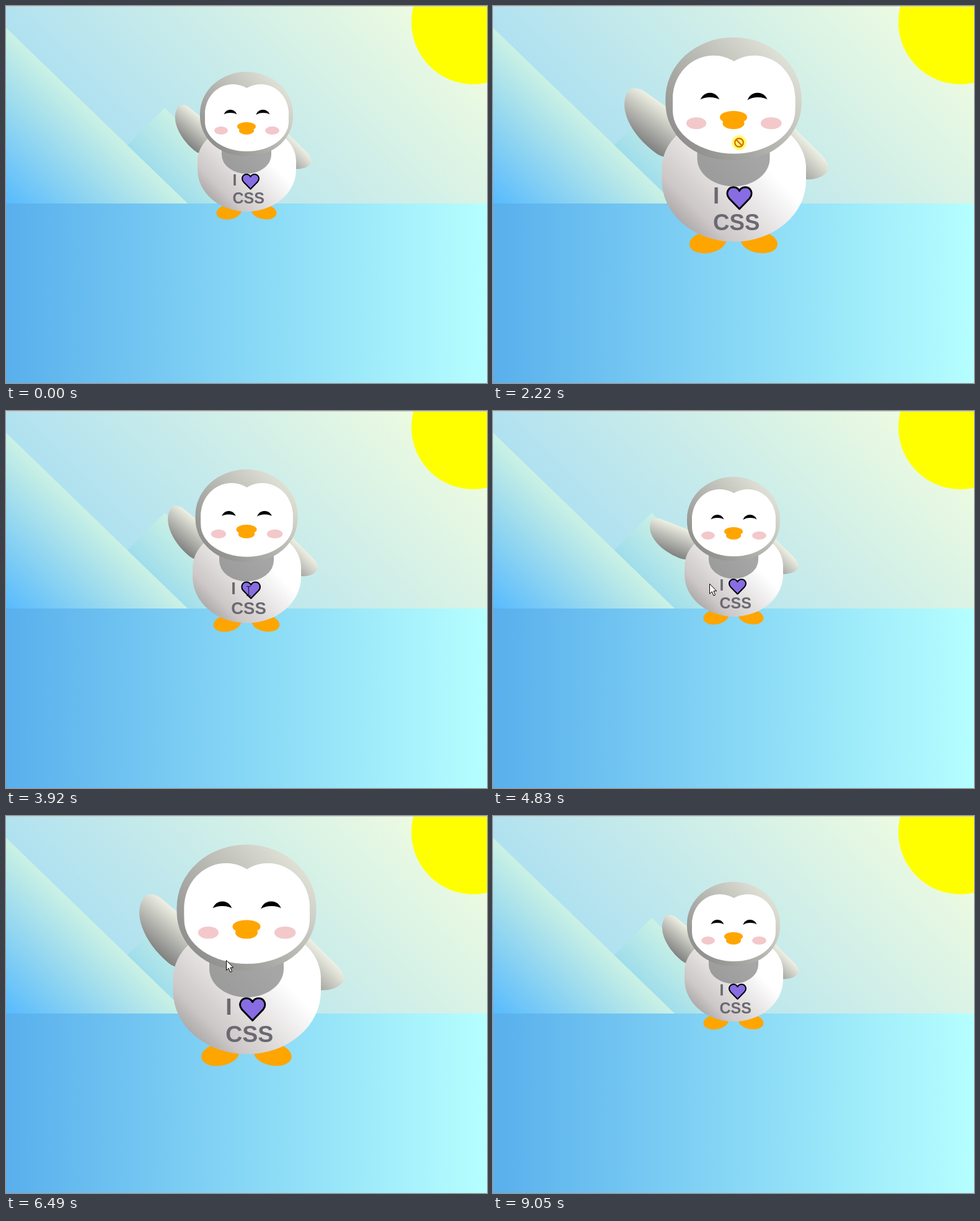
An HTML page that plays this animation: 776 px wide and 607 px high, repeating every 9090 ms.

```html
<!DOCTYPE html>
<html lang="en">
<head>
<meta charset="utf-8">
<title>Waving penguin</title>
<style>
:root { --face: white; --beak: orange; --skin: gray; }
html, body { margin: 0; width: 100%; height: 100%; overflow: hidden; background: #cbcbcb; }
body { position: relative; }
body *:not(svg *) { position: absolute; }

.sky { left: -4px; top: 1px; width: 784px; height: 682px;
  background: linear-gradient(45deg, rgb(118, 201, 255), rgb(247, 255, 222)); }
.scene { left: 0; top: 1px; width: 776px; height: 606px; overflow: hidden; }
.sun { left: 654px; top: -75px; width: 200px; height: 200px; border-radius: 50%; background: yellow; }
.mountain { width: 300px; height: 300px; }
.mountain.back { left: 106px; top: 225px; transform: rotate(45deg);
  background: linear-gradient(rgb(203, 241, 228), rgb(47, 170, 255)); }
.mountain.front { left: -4px; top: 175px; transform: skewY(44deg);
  background: linear-gradient(rgb(203, 241, 228), rgb(80, 183, 255)); }
.ground { left: -4px; top: 317px; width: 784px; height: 307px;
  background: linear-gradient(90deg, rgb(88, 175, 236), rgb(182, 255, 255)); }

.penguin { left: 238px; top: 76px; width: 300px; height: 300px; isolation: isolate; }
.head { width: 50%; height: 45%; top: 10%; left: 25%; z-index: 1;
  border-radius: 70% 70% 65% 65%;
  background: linear-gradient(45deg, var(--skin), rgb(239, 240, 228)); }
.face { width: 60%; height: 70%; top: 15%; border-radius: 70% 70% 60% 60%; background: var(--face); }
.face.left { left: 5%; }
.face.right { right: 5%; }
.chin { width: 90%; height: 70%; top: 25%; left: 5%;
  border-radius: 70% 70% 100% 100%; background: var(--face); }
.eye { width: 15%; height: 17%; top: 45%; border-radius: 50%; background: black; }
.eye.left { left: 25%; }
.eye.right { right: 25%; }
.lid { width: 150%; height: 100%; top: 25%; left: -23%; border-radius: 50%; background: var(--face); }
.blush { width: 15%; height: 10%; top: 65%; border-radius: 50%; background: #f3c8ca; }
.blush.left { left: 15%; }
.blush.right { right: 15%; }
.beak { height: 10%; border-radius: 50%; background: var(--beak); }
.beak.top { width: 20%; top: 60%; left: 40%; }
.beak.bottom { width: 16%; top: 65%; left: 42%; }

.shirt { top: 165px; left: 127.5px; z-index: 1; color: #6a6971;
  font: bold 25px "Liberation Sans", Helvetica, sans-serif; }
.shirt p { margin: 25px 0; white-space: nowrap; }
.shirt svg { left: 14.5px; top: 27.5px; }

.body { width: 53%; height: 45%; top: 40%; left: 23.5%;
  border-radius: 80% 80% 100% 100%;
  background: linear-gradient(45deg, rgb(134, 133, 133), rgb(205, 199, 199) 25%, white 67%); }
.body::before { content: ""; position: absolute; width: 50%; height: 45%; top: 10%; left: 25%;
  border-radius: 0 0 100% 100%; background: var(--skin); opacity: .7; }
.arm { width: 30%; height: 60%; z-index: -1; border-radius: 30% 30% 30% 120%;
  background: linear-gradient(90deg, var(--skin), rgb(239, 240, 228)); }
.arm.left { top: 35%; left: 5%; transform-origin: top left; }
.arm.right { top: 0; right: -5%; transform: rotate(-45deg); }
.foot { width: 15%; height: 30%; top: 85%; z-index: -1; border-radius: 50%; background: var(--beak); }
.foot.left { left: 25%; transform: rotate(80deg); }
.foot.right { right: 25%; transform: rotate(-80deg); }

.pointer { left: 0; top: 0; }
</style>
</head>
<body>
<div class="scene">
  <div class="sky" style="top:0"></div>
  <div class="sun"></div>
  <div class="mountain back"></div>
  <div class="mountain front"></div>
  <div class="ground"></div>
</div>

<div class="penguin">
  <div class="head">
    <div class="face left"></div>
    <div class="face right"></div>
    <div class="chin"></div>
    <div class="eye left"><div class="lid"></div></div>
    <div class="eye right"><div class="lid"></div></div>
    <div class="blush left"></div>
    <div class="blush right"></div>
    <div class="beak top"></div>
    <div class="beak bottom"></div>
  </div>
  <div class="shirt">
    <svg width="29" height="28">
      <path d="M14.5 25.8 L3.2 14.2 C-1.2 9 1.8 2 8 2 Q12.5 2 14.5 6 Q16.5 2 21 2 C27.2 2 30.2 9 25.8 14.2 Z"
        fill="#886ce4" stroke="#000" stroke-width="2" stroke-linejoin="round"/>
    </svg>
    <p>I<br>CSS</p>
  </div>
  <div class="body">
    <div class="arm left"></div>
    <div class="arm right"></div>
    <div class="foot left"></div>
    <div class="foot right"></div>
  </div>
</div>

<svg class="pointer" width="776" height="607">
  <g id="arrow">
    <path d="M.5 .5 V16.5 L4.2 13 L6.9 19.4 L9.6 18.2 L6.9 12 H11.8 Z" fill="#fff" stroke="#000"/>
  </g>
  <g id="beam" fill="none">
    <path d="M-3.5 -7.5 H-1 L0 -6.5 L1 -7.5 H3.5 M0 -6.5 V6.5 M-3.5 7.5 H-1 L0 6.5 L1 7.5 H3.5" stroke="#222" stroke-width="1.2"/>
  </g>
  <g id="blocked" fill="none" stroke="#dc7008" stroke-width="2.4">
    <circle r="12" fill="#ff0" fill-opacity=".55" stroke="none"/>
    <circle r="6.8"/>
    <path d="M-4.8 -4.8 L4.8 4.8"/>
  </g>
</svg>

<script>
const LOOP = 9090, GROW = 965, WAVE = 1165;
const presses = [[1440, 3255], [5320, 6480]];
const waveStarts = [1705, 4560, 7515];
const visits = [[100, 8270], [8920, 9050]];
// Pointer stops: time, x, y
const path = [
  [100, 697, 597], [330, 563, 529], [530, 458, 424], [760, 400, 310], [960, 392, 281],
  [1250, 397, 220], [3700, 397, 220], [4180, 385, 372], [4350, 368, 465], [4480, 367, 454],
  [4830, 349, 278], [5060, 355, 232], [7150, 355, 232], [7450, 374, 290], [7560, 375, 291],
  [7800, 475, 465], [8230, 637, 597], [8920, 740, 597]
];

const penguin = document.querySelector('.penguin');
const arm = document.querySelector('.arm.left');
const pointers = ['arrow', 'beam', 'blocked'].map(id => document.getElementById(id));
const clamp = v => Math.min(1, Math.max(0, v));
const within = (t, [a, b]) => t >= a && t < b;

// cubic-bezier(.42, 0, .58, 1)
function easeInOut(x) {
  let lo = 0, hi = 1;
  for (let i = 0; i < 24; i++) {
    const u = (lo + hi) / 2, v = 1 - u;
    if (1.26 * u * v * v + 1.74 * u * u * v + u * u * u < x) lo = u; else hi = u;
  }
  return lo * lo * (3 - 2 * lo);
}

function scaleAt(t) {
  const grown = presses.reduce((sum, [down, up]) =>
    sum + easeInOut(clamp((t - down) / GROW)) - easeInOut(clamp((t - up) / GROW)), 0);
  return 1 + grown / 2;
}

function armAngle(t) {
  const start = waveStarts.find(s => within(t, [s, s + WAVE]));
  if (start === undefined) return 130;
  const swing = (t - start) / WAVE * 4 % 2;
  return 130 - 20 * (1 - Math.abs(1 - swing));
}

function pointerAt(t) {
  const i = path.findIndex(p => p[0] > t);
  if (i < 1) return path.at(i).slice(1);
  const [a, b] = [path[i - 1], path[i]];
  const k = (t - a[0]) / (b[0] - a[0]);
  return [a[1] + (b[1] - a[1]) * k, a[2] + (b[2] - a[2]) * k];
}

function draw(t) {
  penguin.style.transform = `scale(${scaleAt(t)})`;
  arm.style.transform = `rotate(${armAngle(t)}deg) scaleX(-1)`;

  const [x, y] = pointerAt(t);
  const overText = within(x, [364, 418]) && within(y, [266, 323]);
  const kind = presses.some(p => within(t, p)) ? 'blocked' : overText ? 'beam' : 'arrow';
  const visible = visits.some(v => within(t, v));
  for (const p of pointers) {
    p.style.display = visible && p.id === kind ? '' : 'none';
    p.setAttribute('transform', `translate(${x} ${y})`);
  }
}

const begin = performance.now();
function tick(now) {
  draw(Math.max(0, now - begin) % LOOP);
  requestAnimationFrame(tick);
}
draw(0);
requestAnimationFrame(tick);
</script>
</body>
</html>
```
